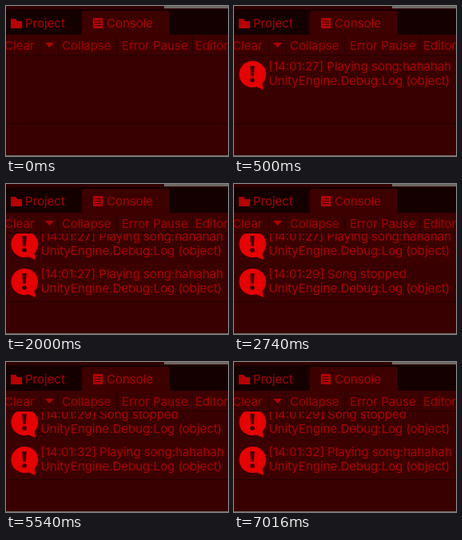
Recreate the animation shown at these times as an HTML page. Size 278 px wide and 188 px high, loop 8 s.

```html
<!DOCTYPE html>
<html lang="en">
<head>
<meta charset="utf-8">
<title>Console log</title>
<style>
  html, body { margin: 0; width: 100%; height: 100%; overflow: hidden; background: #380000; }
  svg { display: block; width: 278px; height: 188px; }
  text { font: 15px Inter, sans-serif; fill: #ae0000; white-space: pre; }
  .tools text { fill: #a40000; }
  .line { fill: #240000; }
</style>
</head>
<body>
<svg viewBox="0 0 278 188">
  <defs>
    <clipPath id="view"><rect y="62" width="278" height="85"/></clipPath>
    <g id="bubble">
      <path fill="#e80000" d="M23 7a16.5 16.5 0 1 0 5 32.2L37 43L35.5 35A16.5 16.5 0 0 0 23 7Z"/>
      <path fill="#380000" d="M20.3 13h5.4l-1 13h-3.4Z"/>
      <circle cx="23" cy="31" r="2.8" fill="#380000"/>
    </g>
  </defs>

  <rect width="278" height="188" fill="#380000"/>
  <g id="list" clip-path="url(#view)"><g id="rows"></g></g>
  <rect class="line" y="147" width="278" height="1"/>

  <!-- Tab bar -->
  <rect width="278" height="4" fill="#300000"/>
  <rect x="198" width="80" height="3" fill="#6d6862"/>
  <rect y="4" width="278" height="32" fill="#150000"/>
  <path fill="#3c0000" d="M95 36V9q0-3 3-3H202q3 0 3 3V36Z"/>
  <path fill="#b80000" d="M6 16h6l2 3h6v9H6Z"/>
  <text x="24" y="27">Project</text>
  <rect x="109" y="15" width="12" height="13" rx="1" fill="#b80000"/>
  <path stroke="#3c0000" d="M111 18.5h8M111 21.5h8M111 24.5h8"/>
  <text x="126" y="27">Console</text>

  <!-- Toolbar -->
  <g class="tools">
    <rect y="36" width="278" height="26" fill="#3c0000"/>
    <rect class="line" y="61" width="278" height="1"/>
    <path stroke="#280000" d="M43.5 39V59M65.5 37V61M138.5 37V61M233.5 37V61"/>
    <text x="-2" y="55">Clear</text>
    <path fill="#b00000" d="M49 46h11l-5.5 6Z"/>
    <text x="70" y="55">Collapse</text>
    <text x="145" y="55">Error Pause</text>
    <text x="237" y="55">Editor</text>
  </g>
  <rect y="187" width="278" height="1" fill="#6d6862"/>
</svg>
<script>
  const LOOP = 8000, TOP = 62, VIEW = 84, ROW = 47;
  const entries = [
    { at: 500, message: "[14:01:27] Playing song:hahahah" },
    { at: 890, message: "[14:01:27] Playing song:hahahah" },
    { at: 2740, message: "[14:01:29] Song stopped" },
    { at: 5540, message: "[14:01:32] Playing song:hahahah" }
  ];
  const rows = document.getElementById("rows");

  rows.innerHTML = entries.map(({ message }, i) => `
    <g transform="translate(0 ${i * ROW})">
      <rect width="278" height="${ROW}" fill="${i % 2 ? "#3b0000" : "#380000"}"/>
      <use href="#bubble"/>
      <text x="43.5" y="19">${message}</text>
      <text x="43.5" y="36.5">UnityEngine.Debug:Log (object)</text>
    </g>`).join("");

  // The list always stays scrolled to its newest entry.
  function draw(now) {
    const time = now % LOOP;
    const count = entries.filter(entry => entry.at <= time).length;
    const scroll = Math.max(0, count * ROW - VIEW);
    rows.setAttribute("transform", `translate(0 ${TOP - scroll})`);
    [...rows.children].forEach((row, i) => {
      row.style.display = i < count ? "" : "none";
    });
  }

  const start = performance.now();
  function tick() {
    draw(performance.now() - start);
    requestAnimationFrame(tick);
  }
  tick();
</script>
</body>
</html>
```
